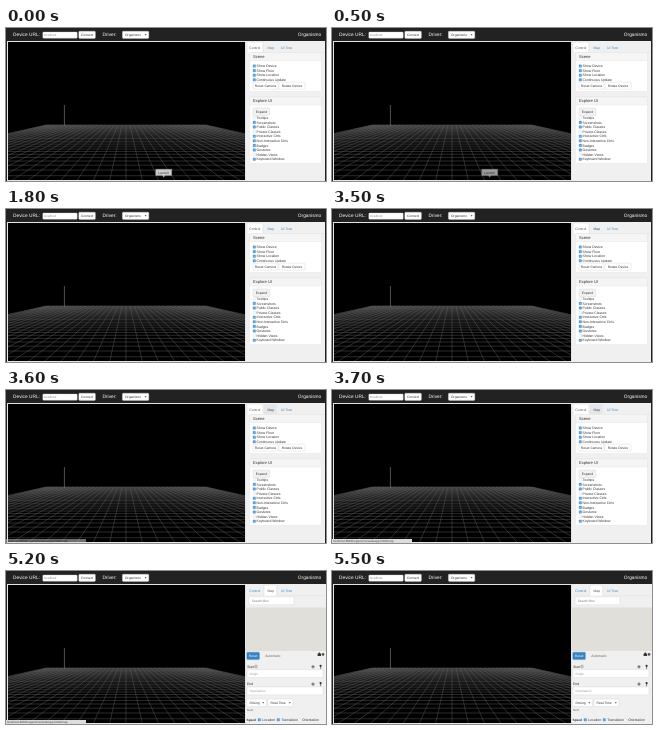
An HTML page that plays this animation: 320x153 px, repeating every 8000 ms.

```html
<!DOCTYPE html>
<html lang="en">
<head>
<meta charset="utf-8">
<style>
  html, body { margin: 0; width: 100%; height: 100%; overflow: hidden; background: #222; }
  svg { display: block; width: 100vw; height: 100vh; }
  text { font-family: "Liberation Sans", Arial, sans-serif; text-rendering: geometricPrecision; }
</style>
</head>
<body>
<svg id="stage" viewBox="0 0 320 153">
  <defs><clipPath id="view"><rect x="2" y="14" width="237" height="138"/></clipPath></defs>
  <rect width="320" height="153" fill="#222"/>
  <g id="navbar"></g>
  <rect x="1" y="13" width="239" height="140" fill="#e4e4e4"/>
  <rect x="2" y="14" width="237" height="138" fill="#000"/>
  <g id="floor" clip-path="url(#view)" fill="none"></g>
  <g id="controlTab"></g>
  <g id="mapTab"></g>
  <g id="dock"></g>
  <g id="status"></g>
</svg>
<script>
const DURATION = 8000;
const BLUE = '#3a83c0';
const el = id => document.getElementById(id);

const text = (x, y, s, size = 3.45, fill = '#333', extra = '') =>
  `<text x="${x}" y="${y}" font-size="${size}" fill="${fill}" ${extra}>${s}</text>`;
const box = (x, y, w, h, fill = '#fff', stroke = '#ccc', r = 0.8) =>
  `<rect x="${x}" y="${y}" width="${w}" height="${h}" rx="${r}" fill="${fill}" stroke="${stroke}" stroke-width=".35"/>`;
const path = (d, stroke, width = 0.5, fill = 'none') =>
  `<path d="${d}" stroke="${stroke}" stroke-width="${width}" fill="${fill}"/>`;
const caret = (x, y) => path(`M${x} ${y}h2l-1 1.2z`, 'none', 0, '#333');
const sidebar = width => `<rect x="240" y="13" width="${width}" height="140" fill="#f0f0f0"/>`;

function button(x, y, w, h, label, fill = '#fff', color = '#333') {
  return box(x, y, w, h, fill, fill === BLUE ? BLUE : '#ccc') +
    text(x + w / 2, y + h / 2 + 1.15, label, 3.3, color, 'text-anchor="middle"');
}

function select(x, y, w, h, label) {
  return box(x, y, w, h) + text(x + 2.6, y + h / 2 + 1.15, label, 3.3) +
    caret(x + w - 4.2, y + h / 2 - 0.5);
}

function checkbox(x, y, label, on = true, gap = 3.6) {
  const mark = on ? path(`M${x + 0.6} ${y}l.7 .7l1-1.5`, '#cfe4f7', 0.35) : '';
  return box(x, y - 1.3, 2.6, 2.6, on ? '#4c97db' : '#fff', on ? '#4c90cf' : '#ccc', 0.5) +
    mark + text(x + gap, y + 1.2, label);
}

function tabs(active) {
  const items = [['Control', 243.3, 241, 16], ['Map', 261.5, 258, 12.8], ['UI Tree', 275, 271.8, 16.5]];
  return path('M240 24.5H319', '#ddd', 0.4) + items.map(([label, x, left, w], i) =>
    (i === active ? path(`M${left} 24.7V15q0-.9 .9-.9h${w - 1.8}q.9 0 .9 .9v9.7`, '#ccc', 0.4, '#fff') : '') +
    text(x, 20.6, label, 3.45, i === active ? '#555' : BLUE, `id="tab${active}${i}"`)).join('');
}

function panel(y, h, title) {
  return box(243.5, y, 72, h, '#fff', '#ddd') +
    box(243.5, y, 72, 8, '#f5f5f5', '#ddd') + text(247, y + 5.4, title, 4.1);
}

function crosshair(x, y) {
  return path(`M${x - 1.7} ${y}h3.4M${x} ${y - 1.7}v3.4`, '#333', 0.7);
}

function pin(x, y) {
  return path(`M${x} ${y - 1}v3.1`, '#333', 0.6) + `<circle cx="${x}" cy="${y - 1}" r="1.1" fill="#333"/>`;
}

function field(y, label, placeholder) {
  return text(240.9, y, label) + crosshair(307, y - 1.2) + pin(314.6, y - 1.2) +
    box(241, y + 1.6, 76, 8) + text(243.5, y + 6.7, placeholder, 3.2, '#999');
}

// A square grid seen in perspective; screen offset from the horizon is focal / depth.
function floorGrid() {
  const cx = 120, horizon = 79, farY = 97, halfWidth = 80, cells = 40, focal = 168, nearScale = 4.2;
  const drop = farY - horizon, spacing = 2 * halfWidth / cells;
  let lines = '';
  for (let i = 0; i <= cells; i++) {
    const x = i * spacing - halfWidth;
    lines += `M${cx + x} ${farY}L${cx + x * nearScale} ${horizon + drop * nearScale}`;
    const scale = focal / (focal - i * spacing);
    if (scale > 0 && scale < nearScale) {
      lines += `M${cx - halfWidth * scale} ${horizon + drop * scale}H${cx + halfWidth * scale}`;
    }
  }
  return path(lines, '#6a6a6a', 0.4) + path('M58.4 77V97.5', '#888', 0.6);
}

el('navbar').innerHTML =
  text(7, 8.2, 'Device URL:', 4.8, '#fff') + box(36.8, 4, 34.4, 6.2) +
  text(37.8, 8.1, 'localhost', 3.2, '#888') + button(72.8, 3.2, 16.6, 7.2, 'Connect') +
  text(96.5, 8.2, 'Driver:', 4.8, '#fff') + select(116.4, 3.2, 26.4, 7.2, 'Organismo') +
  text(315.3, 8.2, 'Organismo', 4.8, '#fff', 'text-anchor="end"');

el('floor').innerHTML = floorGrid();

const sceneOptions = ['Show Device', 'Show Floor', 'Show Location', 'Continuous Update'];
const uiOptions = ['Tooltips', 'Screenshots', 'Public Classes', 'Private Classes', 'Interactive Ctrls',
  'Non-Interactive Ctrls', 'Badges', 'Gestures', 'Hidden Views', 'Keyboard Window'];
const unchecked = ['Tooltips', 'Private Classes', 'Hidden Views'];

el('controlTab').innerHTML = sidebar(79) +
  '<rect id="hover" x="258" y="14.2" width="12.8" height="10.3" rx=".8" fill="#e6e6e6"/>' + tabs(0) +
  panel(24.5, 39, 'Scene') +
  sceneOptions.map((s, i) => checkbox(247, 38 + i * 4.6, s)).join('') +
  button(247, 54.2, 25, 7, 'Reset Camera') + button(273, 54.2, 26, 7, 'Rotate Device') +
  panel(69, 66.5, 'Explore UI') + button(247, 80, 16.8, 7.6, 'Expand', '#f2f2f2') +
  uiOptions.map((s, i) => checkbox(247, 89.8 + i * 4.6, s, !unchecked.includes(s))).join('');

el('mapTab').innerHTML = sidebar(80) +
  tabs(1) + '<rect id="map" x="240" y="36.5" width="80" height="43.5" fill="#e0dfd9"/>' +
  box(243, 25.8, 45, 8) + text(245.8, 31, 'Search Box', 3.3, '#777') +
  button(240.8, 81.2, 12.6, 7.4, 'Reset', BLUE, '#fff') + text(259.2, 86.2, 'Automatic', 3.45, '#666') +
  path('M311.6 85v-2l1.7-1.8l1.7 1.8v2z', 'none', 0, '#333') +
  '<circle cx="317" cy="83.4" r="1.4" fill="#555"/>' +
  field(97, 'Start', 'Origin') + box(249, 94.3, 2, 2.5, 'none', '#333', 0.3) +
  field(114.3, 'End', 'Destination') +
  select(240.8, 128, 19.6, 7.6, 'Driving') + select(262, 128, 25, 7.6, 'Real-Time') +
  text(240.8, 140.3, 'Next', 3, '#666') +
  text(240.5, 150, 'Speed', 3.2, '#333', 'font-weight="bold"') +
  checkbox(252, 148.8, 'Location', true, 4.2) + checkbox(271, 148.8, 'Translation', true, 4.2) +
  checkbox(292, 148.8, 'Orientation', false, 4.2);

el('dock').innerHTML =
  path('M149.7 141.2h16v6.2h-6.8l-1.2 1.9l-1.2-1.9h-6.8z', '#999', 0.4, '#ccc') +
  text(157.7, 145.6, 'Launch', 3.3, '#333', 'text-anchor="middle"');

el('status').innerHTML =
  '<rect x="0" y="149" width="80" height="4" fill="#ddd"/>' +
  text(1, 152, 'localhost:8080/organismo/web/app.html#map', 3, '#444');

function steppedFade(t, start, count) {
  return Math.min(1, Math.max(0, (Math.floor((t - start) / 100) + 1) / count));
}

function render(t) {
  const show = (id, on) => el(id).style.display = on ? '' : 'none';
  const onMap = t >= 4400;
  show('controlTab', !onMap);
  show('mapTab', onMap);
  show('map', t >= 4500);
  show('hover', t >= 3600);
  el('tab01').setAttribute('fill', t >= 3500 ? '#23527c' : BLUE);
  el('dock').style.opacity = 1 - steppedFade(t, 500, 4);
  el('status').style.opacity = steppedFade(t, 3600, 2) - steppedFade(t, 5400, 2);
}

const start = performance.now();
function tick() {
  render((performance.now() - start) % DURATION);
  requestAnimationFrame(tick);
}
tick();
</script>
</body>
</html>
```
